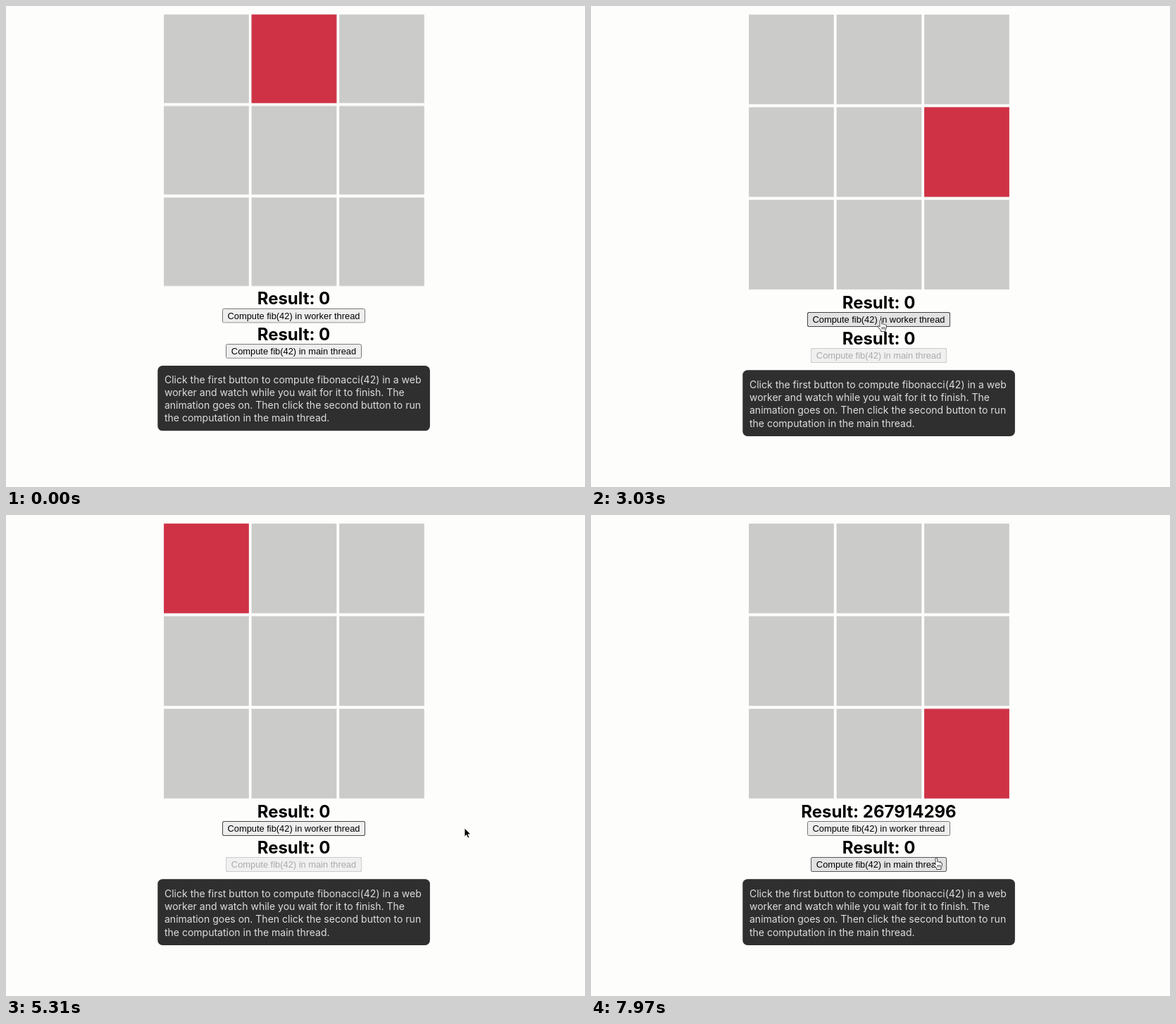
An HTML page for the animation above (8000 ms loop, 822x682 px).

```html
<!DOCTYPE html>
<html lang="en">
<head>
<meta charset="utf-8">
<title>Worker thread and main thread</title>
<style>
  html, body { margin: 0; width: 100%; height: 100%; overflow: hidden; background: #fdfdfb; }
  svg { display: block; width: 822px; height: 682px; }

  .page, .active, .pointer, .arrow, .hand, .state { animation: 8s step-end infinite; }
  .page { transform-origin: 0 0; animation-name: settle; }
  .cell { fill: #cbcbca; }
  .active { fill: #d03245; animation-name: hop; }

  .result { font: 700 24px Inter, "Open Sans", sans-serif; text-anchor: middle; }
  .label { font: 12.87px "Liberation Sans", Arial, sans-serif; text-anchor: middle; }
  .button { fill: #eee; stroke: #767676; }
  .hover { fill: #e2e2e2; stroke: #555; }
  .focus { fill: none; stroke: #444; }
  .disabled rect { fill: #f0f0f0; stroke: #ccc; }
  .disabled text { fill: #aaa; }
  .panel { fill: #2f2f2f; }
  .help { font: 14px Inter, Roboto, sans-serif; fill: #ddd; }

  .before { animation-name: before; }
  .after { animation-name: after; }
  .busy, .focus { animation-name: busy; }
  .over-worker { animation-name: over-worker; }
  .over-main { animation-name: over-main; }
  .pointer { animation-name: present, travel; animation-timing-function: step-end, ease-in-out; }
  .arrow { animation-name: arrow; }
  .hand { animation-name: hand; }

  @keyframes settle {
    0% { transform: scaleY(.9878); }
    1.5%, 100% { transform: none; }
  }
  @keyframes hop {
    0% { transform: translate(124.5px, 0); }
    1.5%, 61.5% { transform: none; }
    11.5%, 31.5% { transform: translate(249px, 131.3px); }
    21.5% { transform: translate(0, 131.3px); }
    51.5% { transform: translate(124.5px, 262.6px); }
    71.5%, 91.5%, 100% { transform: translate(249px, 262.6px); }
    81.5% { transform: translate(124.5px, 131.3px); }
  }
  @keyframes travel {
    0%, 15.5% { transform: translate(606px, 580px); }
    21% { transform: translate(623px, 444px); }
    30% { transform: translate(626px, 446px); }
    34%, 41.25% { transform: translate(410px, 445px); }
    47.5%, 92.4% { transform: translate(651px, 444px); }
    92.5% { transform: translate(632px, 530px); }
    98%, 100% { transform: translate(489px, 486px); }
  }
  @keyframes present {
    0%, 70% { opacity: 0; }
    15.5%, 92.5%, 100% { opacity: 1; }
  }
  @keyframes arrow {
    0%, 42.2% { opacity: 1; }
    33%, 97%, 100% { opacity: 0; }
  }
  @keyframes hand {
    0%, 42.2% { opacity: 0; }
    33%, 97%, 100% { opacity: 1; }
  }
  @keyframes over-worker {
    0%, 42.2%, 100% { opacity: 0; }
    33% { opacity: 1; }
  }
  @keyframes over-main {
    0% { opacity: 0; }
    97%, 100% { opacity: 1; }
  }
  @keyframes busy {
    0%, 87.5%, 100% { opacity: 0; }
    36% { opacity: 1; }
  }
  @keyframes before {
    0% { opacity: 1; }
    87.5%, 100% { opacity: 0; }
  }
  @keyframes after {
    0% { opacity: 0; }
    87.5%, 100% { opacity: 1; }
  }
</style>
</head>
<body>
<svg viewBox="0 0 822 682" xmlns="http://www.w3.org/2000/svg">
  <defs>
    <rect id="cell" x="224.1" y="12.2" width="120.7" height="127.1"/>
    <g id="row" class="cell">
      <use href="#cell"/>
      <use href="#cell" x="124.5"/>
      <use href="#cell" x="249"/>
    </g>
    <rect id="worker" x="307.5" y="434.5" width="202" height="20" rx="2"/>
    <rect id="main" x="312.5" y="485.5" width="192" height="20" rx="2"/>
  </defs>

  <g class="page">
    <use href="#row"/>
    <use href="#row" y="131.3"/>
    <use href="#row" y="262.6"/>
    <use href="#cell" class="active"/>

    <text class="result state before" x="408.5" y="428.6">Result: 0</text>
    <text class="result state after" x="408.5" y="428.6">Result: 267914296</text>
    <use href="#worker" class="button"/>
    <use href="#worker" class="hover state over-worker"/>
    <use href="#worker" class="focus state"/>
    <text class="label" x="408.5" y="449">Compute fib(42) in worker thread</text>

    <text class="result" x="408.5" y="479.6">Result: 0</text>
    <use href="#main" class="button"/>
    <use href="#main" class="hover state over-main"/>
    <text class="label" x="408.5" y="500">Compute fib(42) in main thread</text>
    <g class="disabled state busy">
      <rect x="312.5" y="485.5" width="192" height="20" rx="2"/>
      <text class="label" x="408.5" y="500">Compute fib(42) in main thread</text>
    </g>

    <rect class="panel" x="215.3" y="516.2" width="386.6" height="93.8" rx="7"/>
    <text class="help">
      <tspan x="225" y="541.8">Click the first button to compute fibonacci(42) in a web</tspan>
      <tspan x="225" y="560.1">worker and watch while you wait for it to finish. The</tspan>
      <tspan x="225" y="578.4">animation goes on. Then click the second button to run</tspan>
      <tspan x="225" y="596.7">the computation in the main thread.</tspan>
    </text>
  </g>

  <g class="pointer">
    <path class="arrow" d="M0 0V12.2L2.8 9.6L4.7 14L6.8 13.1L4.9 8.8H8.8Z" fill="#000" stroke="#fff" stroke-width=".8"/>
    <g class="hand" transform="translate(-3 0)" stroke="#333" stroke-linejoin="round" stroke-width=".9">
      <path d="M3 10V1.8Q3-.2 4.4 0T5.8 2V6Q7.6 4.8 8.4 6.4Q10 5.6 10.6 7.2Q12.8 6.8 12.6 9Q12.8 12 11 14V16.5H4.6V14.8L.4 10.2Q-.2 8.2 1.4 8.4Z" fill="#fff"/>
      <path d="M6 10v3.5M8 10v3.5M10 10v3.5" fill="none"/>
    </g>
  </g>
</svg>
</body>
</html>
```
